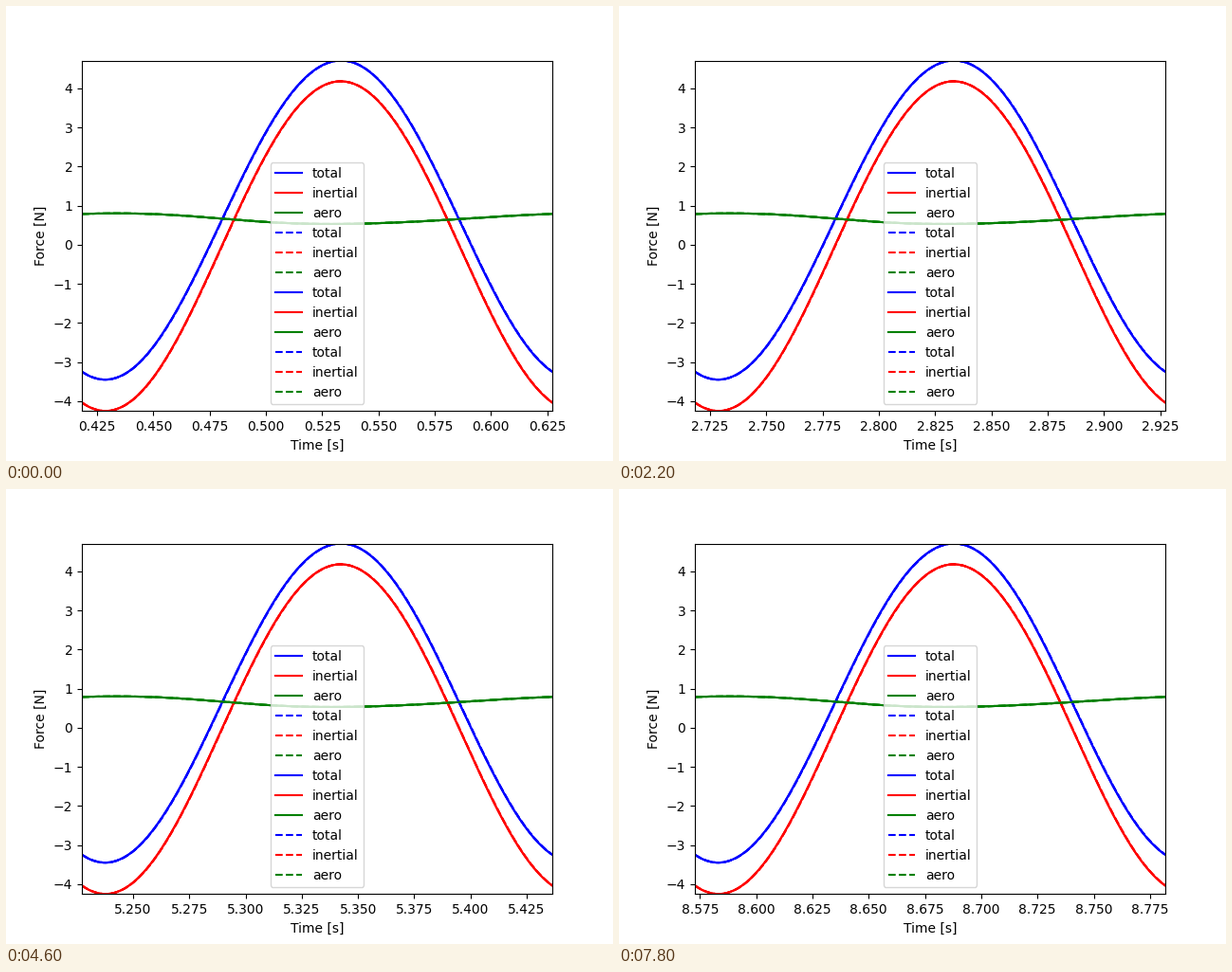
These frames come from a looping animation (640x480 px, 8 s). A matplotlib script:

```python
import numpy as np
import matplotlib.pyplot as plt
from matplotlib.animation import FuncAnimation

FRAMES, INTERVAL = 40, 200
PERIOD = 2.3 / 11          # one flap cycle in seconds
FIRST = 2                  # cycles skipped before the first window
LAG = 0.0006               # dashed curves trail slightly, in cycles

# aero force at ten evenly spaced phases, smoothed by three harmonics
AERO = np.fft.rfft([0.79, 0.80, 0.757, 0.665, 0.575,
                    0.535, 0.54, 0.588, 0.655, 0.732]) / 10


def aero(p):
    waves = sum(2 * (AERO[k] * np.exp(2j * np.pi * k * p)).real
                for k in (1, 2, 3))
    return AERO[0].real + waves


def inertial(p):
    a = 2 * np.pi * (p - 0.05)
    return -4.215 * np.cos(a) - 0.035 * np.cos(2 * a)


def total(p):
    return inertial(p) + aero(p)


CURVES = [("total", "blue", total),
          ("inertial", "red", inertial),
          ("aero", "green", aero)]

fig, ax = plt.subplots(figsize=(6.4, 4.8), dpi=100)
phase = np.linspace(0, 1, 201)
lines = []
for style in ("-", "--", "-", "--"):
    lag = LAG if style == "--" else 0
    for name, color, force in CURVES:
        line, = ax.plot(phase, force(phase - lag), style, color=color,
                        label=name)
        lines.append(line)

ax.set_ylim(-4.25, 4.71)
ax.set_xlabel("Time [s]")
ax.set_ylabel("Force [N]")
ax.legend(loc="lower center")


def update(i):
    start = (FIRST + i) * PERIOD
    for line in lines:
        line.set_xdata(start + phase * PERIOD)
    ax.set_xlim(start, start + PERIOD)
    return lines


anim = FuncAnimation(fig, update, frames=FRAMES, interval=INTERVAL,
                     repeat=True, repeat_delay=0, blit=False)
plt.show()
```
